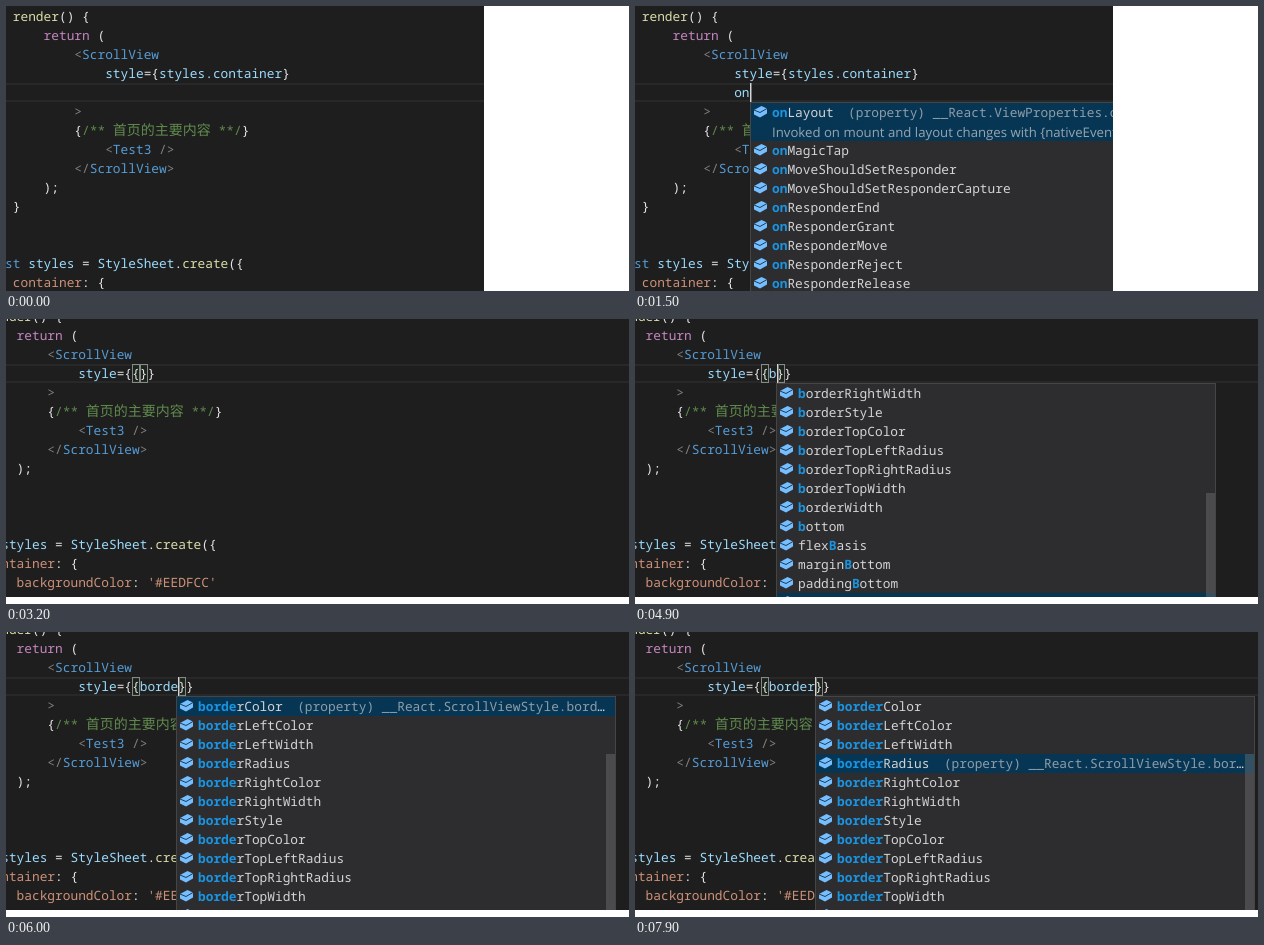
Write an HTML page that moves like this. It is 623x285 px and loops after 8000 ms.

```html
<!DOCTYPE html>
<html lang="en">
<head>
<meta charset="utf-8">
<title>Editor completion</title>
<style>
html, body { margin: 0; width: 623px; height: 285px; overflow: hidden; background: #fff; }
#editor {
  position: absolute; left: 0; top: 0; overflow: hidden; background: #1e1e1e; color: #d4d4d4;
  font: 12.83px/19px "Noto Sans Mono", monospace; text-rendering: geometricPrecision;
  font-variant-ligatures: none;
}
#editor div, #editor svg { position: absolute; white-space: pre; box-sizing: border-box; }
.current { left: 0; width: 100%; height: 19px; border: solid #282828; border-width: 2px 0; }
.bracket { width: 8px; height: 19px; border: 1px solid #888; background: rgba(0, 100, 0, .1); }
.caret { width: 2px; height: 19px; background: linear-gradient(90deg, #d4d4d4 1px, #777 1px); }
.popup { width: 440px; height: 232px; background: #2d2d30; border: 1px solid #454545; overflow: hidden; }
.row { left: 0; width: 438px; height: 19px; }
.row.on { background: #073655; }
.row svg { left: 3px; top: 3px; }
.label { left: 21px; width: 408px; overflow: hidden; text-overflow: ellipsis; }
.label b { color: #1a94e0; font-weight: 600; }
.label small { font-size: inherit; opacity: .65; margin-left: 14.5px; }
.doc { left: 21px; top: 20px; font: 13.2px/18px "Open Sans", sans-serif; opacity: .7; }
.slider { left: 429px; width: 10px; background: rgba(121, 121, 121, .4); }
.tip { left: 134px; top: 18px; width: 181px; height: 29px; padding: 4px 6px; background: #2d2d30; border: 1px solid #454545; }
.k { color: #569cd6 } .v { color: #9cdcfe } .g { color: #808080 } .r { color: #c586c0 }
.c { color: #608b4e } .s { color: #ce9178 } .w { color: #e4e4e4 } .f { color: #dcdcaa }
.h { color: #608b4e; font: 14px/0 "Noto Sans CJK SC", "Noto Sans CJK", sans-serif; }
</style>
</head>
<body>
<div id="editor"></div>
<script>
const CH = 7.697, LINE = 19, LOOP = 8000;
const editor = document.getElementById('editor');

// Each line: column, then pairs of colour class and text.
const head = [[4, 'f', 'render', 'w', '() {'], [8, 'r', 'return', 'w', ' ('], [12, 'g', '<', 'k', 'ScrollView']];
const body = [
  [12, 'g', '>'],
  [12, 'w', '{', 'c', '/** ', 'h', '首页的主要内容', 'c', ' **/', 'w', '}'],
  [16, 'g', '<', 'k', 'Test3', 'g', ' />'],
  [12, 'g', '</', 'k', 'ScrollView', 'g', '>'],
  [8, 'w', ');'], [4, 'w', '}'], [0], [0],
  [0, 'k', 'const', 'v', ' styles', 'w', ' = ', 'v', 'StyleSheet', 'w', '.', 'f', 'create', 'w', '({'],
  [4, 's', 'container', 'w', ': {'],
  [8, 's', 'backgroundColor', 'w', ": ", 's', "'#EEDFCC'"]
];

const scenes = {
  prop: {
    width: 478, height: 285, x: -23.4, y: 1, row: 4, col: 16,
    lines: typed => [...head, [16, 'v', 'style', 'w', '={', 'v', 'styles.container', 'w', '}'], [16, 'v', typed], ...body]
  },
  style: {
    width: 623, height: 278, x: -50.4, y: -12, row: 3, col: 24, brackets: true,
    lines: typed => [...head, [16, 'v', 'style', 'w', '={{', 'v', typed, 'w', '}}'], ...body]
  }
};

const events = ['Layout', 'MagicTap', 'MoveShouldSetResponder', 'MoveShouldSetResponderCapture', 'ResponderEnd',
  'ResponderGrant', 'ResponderMove', 'ResponderReject', 'ResponderRelease'].map(s => 'on' + s);
const borders = ['BottomColor', 'BottomLeftRadius', 'BottomRightRadius', 'BottomWidth', 'Color', 'LeftColor', 'LeftWidth',
  'Radius', 'RightColor', 'RightWidth', 'Style', 'TopColor', 'TopLeftRadius', 'TopRightRadius', 'TopWidth', 'Width'].map(s => 'border' + s);
const styleProps = ['backfaceVisibility', 'backgroundColor', ...borders,
  'bottom', 'flexBasis', 'marginBottom', 'paddingBottom', 'tabBar'];

const list = (left, query, selected = 0) => ({ left, query, selected });

// time, scene, typed text, caret, completion list, tooltip opacity
const steps = [
  [0, 'prop', '', 0], [600, 'prop', '', 1], [1100, 'prop', '', 0],
  [1300, 'prop', 'o', 1], [1400, 'prop', 'on', 1],
  [1500, 'prop', 'on', 1, list(115, 'on')],
  [2000, 'prop', 'on', 0, list(115, 'on')],
  [2400, 'prop', 'on', 1, list(115, 'on')],
  [2900, 'prop', 'on', 0, list(115, 'on')],
  [3200, 'style', '', 0], [4100, 'style', '', 1], [4600, 'style', '', 0],
  [4900, 'style', 'b', 1, list(141, 'b', 11)],
  [5000, 'style', 'bo', 1, list(141, 'b', 11)],
  [5100, 'style', 'bo', 1, list(149, 'bo')],
  [5600, 'style', 'bor', 1, list(157, 'bor')],
  [5800, 'style', 'bord', 1, list(157, 'bor')],
  [5900, 'style', 'bord', 1, list(165, 'bord')],
  [6000, 'style', 'borde', 1, list(170, 'borde')],
  [6100, 'style', 'border', 1, list(170, 'borde')],
  [6200, 'style', 'border', 1, list(180, 'border')],
  [6600, 'style', 'border', 1, list(180, 'border'), .3],
  [6700, 'style', 'border', 0, list(180, 'border'), .7],
  [6800, 'style', 'border', 0, list(180, 'border'), 1],
  [7000, 'style', 'border', 1, list(180, 'border', 1)],
  [7200, 'style', 'border', 1, list(180, 'border', 2)],
  [7500, 'style', 'border', 1, list(180, 'border', 2), .3],
  [7600, 'style', 'border', 1, list(180, 'border', 2), .7],
  [7700, 'style', 'border', 0, list(180, 'border', 2), 1],
  [7900, 'style', 'border', 1, list(180, 'border', 3)]
];

const icon = `<svg width="14" height="12"><path d="M0 4 7.5 0 13 2.5v5l-7 4L0 8.5z" fill="#75beff"/>
<path d="M0 4 6 6.5l7-4" fill="none" stroke="#1f3b52"/></svg>`;

const escapeText = s => s.replace(/&/g, '&amp;').replace(/</g, '&lt;');
const box = (cls, style, html = '') => `<div class="${cls}" style="${style}">${html}</div>`;
const at = (left, top) => `left:${left}px;top:${top}px;`;

function codeLine([col, ...parts], scene, i) {
  let html = '';
  for (let p = 0; p < parts.length; p += 2) html += `<span class="${parts[p]}">${escapeText(parts[p + 1])}</span>`;
  return box('', at(scene.x - .6 + col * CH, scene.y + i * LINE), html);
}

function highlight(label, query) {
  const i = label.toLowerCase().indexOf(query);
  if (i < 0) return label;
  const end = i + query.length;
  return `${label.slice(0, i)}<b>${label.slice(i, end)}</b>${label.slice(end)}`;
}

function popup({ left, query, selected }, top) {
  const isEvent = query === 'on';
  const all = isEvent ? events : styleProps.filter(s => s.toLowerCase().includes(query));
  const first = isEvent ? 0 : query === 'b' ? 11 : 4;
  const owner = isEvent ? 'ViewProperties' : 'ScrollViewStyle';
  let y = 0, html = '';
  all.slice(first, first + 12).forEach((name, i) => {
    const on = i === selected;
    const height = on && isEvent ? 2 * LINE : LINE;
    const type = on ? `<small>(property) __React.${owner}.${name}: any</small>` : '';
    const doc = on && isEvent
      ? box('doc', '', 'Invoked on mount and layout changes with {nativeEvent: {layout: {x, y}}}') : '';
    html += box(on ? 'row on' : 'row', `top:${y}px;height:${height}px`,
      icon + box('label', '', highlight(name, query) + type) + doc);
    y += height;
  });
  if (!isEvent) {
    const unit = 12 * LINE / all.length;
    html += box('slider', `top:${first * unit}px;height:${12 * unit}px`);
  }
  return box('popup', at(left, top), html);
}

function draw([, sceneName, typed, caret, completion, tip]) {
  const scene = scenes[sceneName];
  const top = scene.y + scene.row * LINE;
  const column = n => Math.floor(scene.x + n * CH);
  const caretX = column(scene.col + typed.length);
  let html = box('current', `top:${top}px`);
  if (scene.brackets) html += box('bracket', at(column(scene.col - 1), top)) + box('bracket', at(caretX, top));
  html += scene.lines(typed).map((line, i) => codeLine(line, scene, i)).join('');
  if (caret) html += box('caret', at(caretX, top));
  if (completion) html += popup(completion, top + LINE);
  if (tip) html += box('tip', `opacity:${tip}`, '(property) border: any');
  editor.style.width = scene.width + 'px';
  editor.style.height = scene.height + 'px';
  editor.innerHTML = html;
}

const start = performance.now();
let shown;
function tick() {
  const time = Math.max(0, performance.now() - start) % LOOP;
  const step = steps.findLast(s => s[0] <= time);
  if (step !== shown) draw(shown = step);
  requestAnimationFrame(tick);
}
tick();
</script>
</body>
</html>
```
